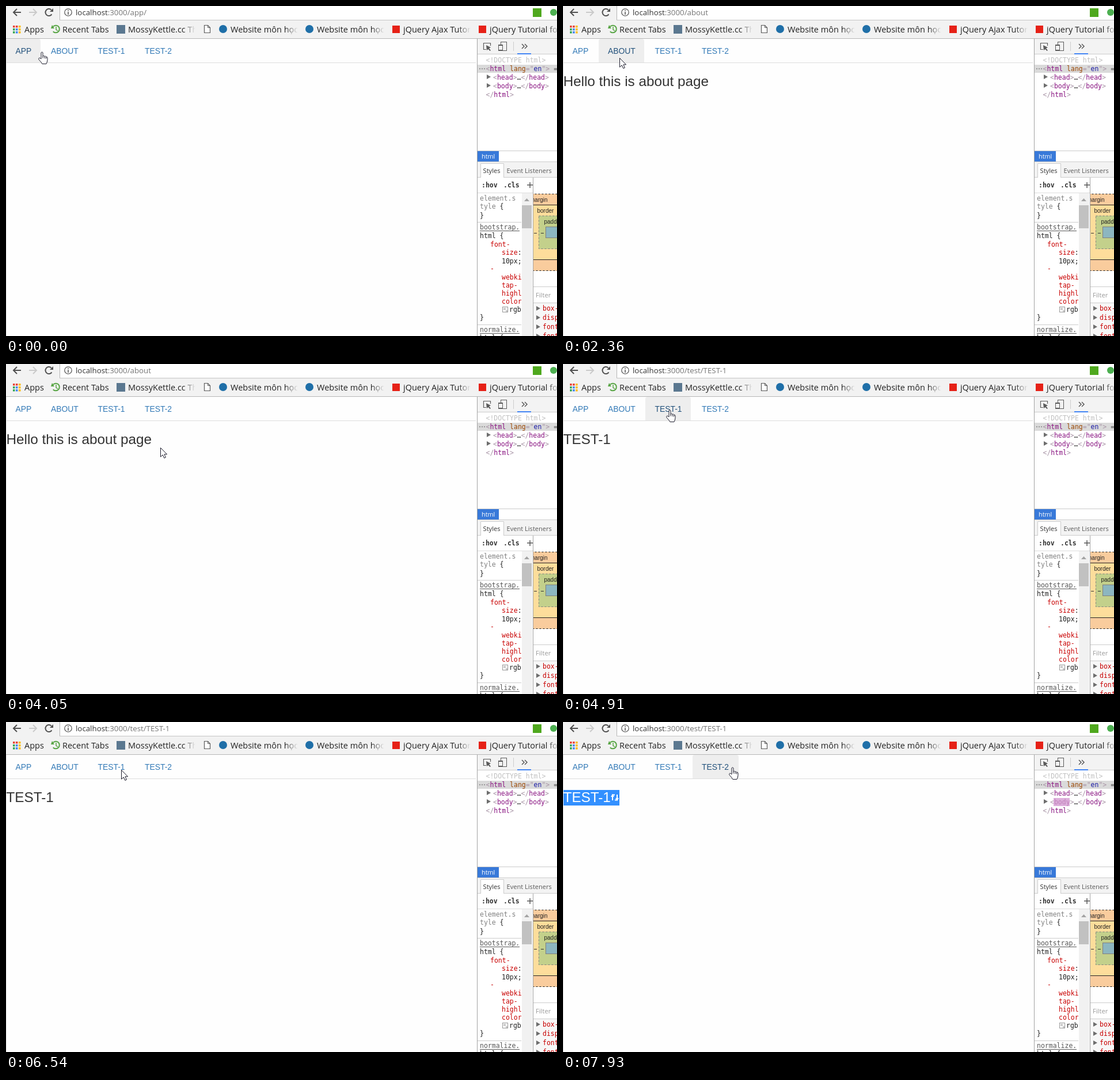
These frames come from a looping animation (957 px wide and 573 px high, 7.99 s). An HTML page with a canvas:

```html
<!DOCTYPE html>
<html lang="en">
<head>
<meta charset="utf-8">
<title>Router demo</title>
<style>
html, body { margin: 0; width: 100%; height: 100%; overflow: hidden; background: #fff; }
canvas { display: block; }
</style>
</head>
<body>
<canvas id="stage" width="957" height="573"></canvas>
<script>
const ctx = document.getElementById('stage').getContext('2d');
const LOOP = 7990;
const UI = '"Open Sans", "Noto Sans", sans-serif';
const ARIAL = '"Liberation Sans", Arial, sans-serif';
const MONO = '11.5px "DejaVu Sans Mono", monospace';
const HEAD = '24.3px ' + ARIAL;
const PURPLE = '#881280', BRACKET = '#a894a6', RED = '#c80000';

function rect(x, y, w, h, color) {
  ctx.fillStyle = color;
  ctx.fillRect(x, y, w, h);
}

function text(str, x, y, font, color) {
  ctx.font = font;
  ctx.fillStyle = color;
  ctx.fillText(str, x, y);
}

function width(str, font) {
  ctx.font = font;
  return ctx.measureText(str).width;
}

// Runs of differently coloured text: [string, color, string, color, ...]
function runs(x, y, font, parts) {
  for (let i = 0; i < parts.length; i += 2) {
    text(parts[i], x, y, font, parts[i + 1]);
    x += width(parts[i], font);
  }
}

function clipped(x, y, w, h, draw) {
  ctx.save();
  ctx.beginPath();
  ctx.rect(x, y, w, h);
  ctx.clip();
  draw();
  ctx.restore();
}

function line(points, color, w = 1, close = false) {
  ctx.beginPath();
  points.forEach(([x, y]) => ctx.lineTo(x, y));
  if (close) ctx.closePath();
  ctx.strokeStyle = color;
  ctx.lineWidth = w;
  ctx.stroke();
}

function shape(points, color) {
  ctx.beginPath();
  points.forEach(([x, y]) => ctx.lineTo(x, y));
  ctx.fillStyle = color;
  ctx.fill();
}

function arc(x, y, r, from, to, color, w) {
  ctx.beginPath();
  ctx.arc(x, y, r, from, to);
  ctx.strokeStyle = color;
  ctx.lineWidth = w;
  ctx.stroke();
}

function disc(x, y, r, color) {
  ctx.beginPath();
  ctx.arc(x, y, r, 0, 7);
  ctx.fillStyle = color;
  ctx.fill();
}

function frame(x, y, w, h, color, dash = []) {
  ctx.setLineDash(dash);
  ctx.strokeStyle = color;
  ctx.lineWidth = 1;
  ctx.strokeRect(x + .5, y + .5, w, h);
  ctx.setLineDash([]);
}

// ---- timeline ----

const latest = (list, t) => list.filter(e => e[0] <= t).pop();

const pages = [
  [0, 'app/', ''],
  [1700, 'about', 'Hello this is about page'],
  [4910, 'test/TEST-1', 'TEST-1']
];

const hovers = [[0, 'APP'], [100, ''], [150, 'ABOUT'], [2630, ''],
  [4500, 'TEST-1'], [6290, ''], [7760, 'TEST-2']];

// time, x, y of the hot spot, pointer used until the next entry
const path = [
  [0, 62, 79, 'hand'], [50, 62, 79, 'hand'], [460, 136, 79, 'hand'],
  [960, 136, 79, 'hand'], [1180, 120, 79, 'hand'], [2300, 120, 79, 'arrow'],
  [2490, 50, 112, 'arrow'], [2630, 50, 112, 'beam'], [2900, 31, 131, 'beam'],
  [3000, 31, 131, 'beam'], [3110, 70, 132, 'beam'], [3170, 97, 133, 'beam'],
  [3410, 254, 147, 'beam'], [3540, 273, 148, 'beam'], [3720, 271, 146, 'arrow'],
  [3850, 268, 145, 'arrow'], [4050, 268, 145, 'arrow'], [4500, 202, 92, 'hand'],
  [4730, 185, 79, 'hand'], [5470, 185, 79, 'hand'], [5600, 205, 56, 'arrow'],
  [5780, 236, 24, 'beam'], [5900, 247, 17, 'beam'], [6230, 323, 13, 'beam'],
  [6290, 323, 13, 'arrow'], [6660, 141, 116, 'arrow'], [6840, 141, 116, 'beam'],
  [7100, 72, 122, 'beam'], [7220, 85, 125, 'beam'], [7400, 85, 125, 'arrow'],
  [7650, 235, 112, 'arrow'], [7760, 268, 92, 'hand'], [7900, 294, 78, 'hand'],
  [LOOP, 294, 78, 'hand']
];

function pointerAt(t) {
  let i = 0;
  while (i < path.length - 2 && path[i + 1][0] <= t) i++;
  const a = path[i], b = path[i + 1];
  const k = (t - a[0]) / (b[0] - a[0]);
  return { x: a[1] + (b[1] - a[1]) * k, y: a[2] + (b[2] - a[2]) * k, kind: a[3] };
}

// ---- browser chrome ----

function bookmark(label, x, end) {
  const g = ctx.createLinearGradient(end - 22, 0, end, 0);
  g.addColorStop(0, '#222');
  g.addColorStop(1, 'rgba(34,34,34,0)');
  clipped(x - 2, 28, end - x + 2, 26, () => text(label, x, 46, '14.5px ' + UI, g));
}

function toolbar(t, url) {
  rect(0, 0, 957, 57, '#f2f2f2');
  rect(93, 0, 864, 24, '#fff');
  rect(93, 0, 1, 24, '#b4b4b4');
  rect(93, 24, 864, 1, '#c4c4c4');
  rect(0, 56, 957, 1, '#b6b6b6');

  line([[26, 11], [13, 11]], '#505050', 2);
  line([[19, 5], [13, 11], [19, 17]], '#505050', 2);
  line([[40, 11], [53, 11]], '#cacaca', 2);
  line([[47, 5], [53, 11], [47, 17]], '#cacaca', 2);
  arc(74.5, 11, 6, .6, 5.5, '#505050', 2);
  shape([[82, 4], [82, 10], [76, 10]], '#505050');

  arc(108, 11, 6.2, 0, 7, '#5a5a5a', 1.3);
  rect(107.2, 10, 1.6, 5, '#5a5a5a');
  rect(107.2, 7, 1.6, 1.7, '#5a5a5a');
  runs(121, 16, '13.3px ' + UI, ['localhost', '#333', ':3000/' + url, '#757575']);
  rect(915, 4, 15, 15, '#4fa81e');
  disc(951, 11, 6, '#4caf50');

  const dots = ['#ea4335', '#ea4335', '#fbbc05', '#34a853', '#4285f4', '#fbbc05', '#34a853', '#4285f4', '#fbbc05'];
  dots.forEach((c, i) => rect(12 + i % 3 * 5, 34 + Math.floor(i / 3) * 5, 3.5, 3.5, c));
  bookmark('Apps', 32, 95);
  arc(86.5, 40, 6.3, -2.4, 2.4, '#58a545', 2);
  shape([[78, 39], [84, 39], [80, 33]], '#58a545');
  line([[87, 36], [87, 41], [90, 43]], '#58a545', 1.5);
  bookmark('Recent Tabs', 98, 215);

  if (t >= 5650 && t < 6330) {
    ctx.fillStyle = '#e7e7e7';
    ctx.beginPath();
    ctx.roundRect(186, 27, 148, 27, 3);
    ctx.fill();
  }
  rect(192, 33, 15, 15, '#5b7890');
  bookmark('MossyKettle.cc Th', 212, 329);
  shape([[344, 33], [350, 33], [354, 37], [354, 47], [344, 47]], '#fff');
  line([[344.5, 33.5], [350.5, 33.5], [354.5, 37.5], [354.5, 46.5], [344.5, 46.5]], '#5a5a5a', 1.2, true);
  line([[350.5, 33.5], [350.5, 37.5], [354.5, 37.5]], '#5a5a5a');
  [377, 527].forEach(x => {
    disc(x, 40, 7, '#1f6fa8');
    bookmark('Website môn học', x + 13, x + 130);
  });
  rect(671, 34, 13, 13, '#e62117');
  bookmark('jQuery Ajax Tutorial', 690, 807);
  rect(821, 34, 13, 13, '#e62117');
  bookmark('jQuery Tutorial for', 840, 962);
}

// ---- page ----

const tabs = [['APP', 1, 59, 16.5], ['ABOUT', 62, 79, 78], ['TEST-1', 143, 79, 159.5], ['TEST-2', 225, 80, 241]];

function nav(hover) {
  rect(0, 57, 818, 516, '#fefefe');
  rect(0, 57, 1, 516, '#e2e2e2');
  rect(1, 98, 815, 1, '#ddd');
  for (const [label, x, w, tx] of tabs) {
    const on = label === hover;
    if (on) {
      ctx.fillStyle = '#eee';
      ctx.beginPath();
      ctx.roundRect(x, 57, w, 41, [4, 4, 0, 0]);
      ctx.fill();
    }
    text(label, tx, 83, '13.9px ' + ARIAL, on ? '#23527c' : '#337ab7');
  }
}

// End of the selection, snapped to the letter nearest the dragged pointer
function dragEnd(str, x) {
  let end = 2;
  for (let i = 3; i <= str.length; i++) {
    const a = width(str.slice(0, i - 1), HEAD), b = width(str.slice(0, i), HEAD);
    if (x > (a + b) / 2) end = i;
  }
  return width(str.slice(0, end), HEAD);
}

function heading(t, str) {
  text(str, .5, 139, HEAD, '#333');
  let from = 0, to = 0;
  if (t >= 3000 && t < 4050) {
    from = Math.round(width('He', HEAD));
    to = Math.round(dragEnd(str, pointerAt(t - 60).x));
  } else if (t >= 7200) {
    to = t < 7460 ? 81 : 97;
  }
  if (to <= from) return;
  clipped(from + 1, 118, to - from, 27, () => {
    rect(0, 118, 300, 27, '#3390ff');
    text(str, .5, 139, HEAD, '#fff');
  });
  if (to === 97) {
    line([[90, 126.5], [86, 126.5], [86, 136]], '#fff', 2);
    shape([[83, 130], [86, 125], [89, 130]], '#fff');
    line([[90, 135.5], [94, 135.5], [94, 126]], '#fff', 2);
    shape([[91, 132], [94, 137], [97, 132]], '#fff');
  }
}

// ---- developer tools ----

function triangle(x, y) {
  shape([[x, y - 4], [x + 7, y], [x, y + 4]], '#6e6e6e');
}

function elements(t) {
  rect(818, 57, 139, 516, '#fff');
  rect(819, 57, 138, 26, '#f3f3f3');
  rect(819, 83, 138, 1, '#ccc');
  line([[841.5, 69], [841.5, 64.5], [829.5, 64.5], [829.5, 75.5], [834, 75.5]], '#5a5a5a', 1.2);
  shape([[834, 68], [842, 72], [839, 73.5], [842, 77], [840.5, 78], [837.5, 75], [835, 77]], '#5a5a5a');
  frame(859, 62, 10, 15, '#5a5a5a');
  rect(855, 67, 8, 11, '#5a5a5a');
  rect(856, 69, 6, 7, '#f3f3f3');
  rect(881, 62, 1, 16, '#ccc');
  for (const x of [896, 901]) line([[x, 66], [x + 4, 70], [x, 74]], '#5a5a5a', 1.5);
  rect(888, 82, 24, 2, '#4285f4');

  text('<!DOCTYPE html>', 833.5, 98, MONO, '#c0c0c0');
  rect(819, 102, 138, 14, '#dadada');
  for (let i = 0; i < 3; i++) rect(822 + i * 4, 108, 2, 2, '#999');
  runs(833.5, 113, MONO, ['<', BRACKET, 'html', PURPLE, ' lang', '#994500', '="', BRACKET,
    'en', '#1a1aa6', '"', BRACKET, '>', BRACKET, ' == $0', '#555']);
  ['head', 'body'].forEach((tag, i) => {
    const y = 128 + i * 15;
    triangle(835, y - 5);
    runs(846, y, MONO, ['<', BRACKET, tag, PURPLE, '>', BRACKET, '…', '#333',
      '</', BRACKET, tag, PURPLE, '>', BRACKET]);
  });
  if (t >= 7500) {
    const a = 1 - (t - 7500) / 1400;
    rect(852, 132, 28, 14, '#fff');
    rect(852, 132, 28, 14, `rgba(190,100,185,${a * .75})`);
    text('body', 852.9, 143, MONO, `rgba(160,80,152,${1 - a * .75})`);
  }
  runs(833.5, 158, MONO, ['</', BRACKET, 'html', PURPLE, '>', BRACKET]);

  rect(819, 251, 138, 1, '#ccc');
  rect(819, 252, 37, 18, '#3879d9');
  text('html', 826, 265, '10.8px ' + UI, '#fff');
  rect(819, 270, 138, 1, '#ccc');
}

function styles() {
  rect(819, 271, 138, 27, '#f3f3f3');
  rect(819, 297, 138, 1, '#ccc');
  rect(824, 273, 40, 25, '#fff');
  line([[824.5, 298], [824.5, 273.5], [864.5, 273.5], [864.5, 298]], '#ccc');
  text('Styles', 828.5, 290, '11.2px ' + UI, '#333');
  text('Event Listeners', 869.5, 290, '11.1px ' + UI, '#5a5a5a');
  text(':hov', 826, 315, 'bold ' + MONO, '#333');
  text('.cls', 864, 315, 'bold ' + MONO, '#333');
  rect(905, 310, 10, 1.5, '#5a5a5a');
  rect(909.3, 306, 1.5, 10, '#5a5a5a');
  rect(819, 324, 96, 1, '#ddd');

  clipped(819, 325, 76, 248, () => {
    const put = (str, x, y, color) => text(str, x, y, MONO, color);
    const link = (str, y) => {
      put(str, 823, y, '#555');
      rect(823, y + 2, 69, 1, '#555');
    };
    put('element.s', 823, 338, '#808080');
    runs(823, 352, MONO, ['tyle', '#808080', ' {', '#222']);
    put('}', 823, 368, '#222');
    rect(819, 375, 76, 1, '#ccc');
    link('bootstrap.', 388);
    put('html {', 823, 403, '#222');
    put('font-', 841, 418, RED);
    runs(861, 432, MONO, ['size', RED, ':', '#222']);
    put('10px;', 861, 447, '#222');
    put('-', 841, 460, RED);
    ['webkit-', 'tap-', 'highlight-', 'color:'].forEach((s, i) => put(s, 861, 475 + i * 14, RED));
    frame(862, 522, 9, 9, '#999');
    rect(864, 524, 4, 4, '#ccc');
    rect(868, 528, 3, 3, '#ccc');
    put('rgba(', 874, 531, '#222');
    put('}', 823, 545, '#222');
    rect(819, 553, 76, 1, '#ccc');
    link('normalize.', 566);
    put('html {', 823, 580, '#222');
  });

  rect(896, 325, 18, 248, '#f1f1f1');
  shape([[900, 339], [904.5, 334], [909, 339]], '#a3a3a3');
  rect(896, 346, 17, 40, '#c1c1c1');
  rect(915, 298, 1, 275, '#a3a3a3');
}

function boxModel() {
  const small = '10px ' + ARIAL;
  clipped(916, 298, 41, 275, () => {
    rect(916, 326, 41, 134, '#f9cc9d');
    frame(900, 326, 80, 133, '#222', [3, 3]);
    text('margin', 910, 340, small, '#222');
    rect(916, 345, 41, 96, '#fddd9b');
    frame(900, 345, 80, 95, '#222');
    text('border', 922.5, 359, small, '#222');
    rect(925, 364, 40, 58, '#c3d08b');
    frame(925, 364, 80, 57, '#808080', [3, 3]);
    text('padding', 934.5, 378, small, '#222');
    rect(937, 383, 40, 20, '#8cb6c0');
    frame(937, 383, 80, 19, '#808080');
    rect(917, 394, 5, 1, '#333');
    rect(929, 394, 5, 1, '#333');
    rect(916, 487, 41, 1, '#ccc');
    text('Filter', 920, 506, '11.2px ' + UI, '#999');
    rect(916, 515, 41, 58, '#f7f7f7');
    rect(916, 515, 41, 1, '#ccc');
    ['box-sizing', 'display', 'font-family', 'font-size'].forEach((name, i) => {
      triangle(921, 525 + i * 16);
      text(name, 932, 529 + i * 16, MONO, RED);
    });
  });
  rect(818, 57, 1, 516, '#a3a3a3');
}

// ---- pointers ----

const hand = new Path2D('M5 13V2Q6.5-.6 8 2V8Q9.8 6.6 11 8.4Q12.6 7.4 13.6 9.2Q15.6 8.6 16 11V14.5Q15.8 18 14 21.5H6.8Q5.5 18.5 1.4 14.5Q-.4 11.6 1.8 11Q3.4 11.2 5 13Z');
const arrow = new Path2D('M.5.5V16.2L4.2 12.8L6.8 18.4L9.4 17.2L6.9 11.8H11.6Z');

const pointers = {
  hand() {
    ctx.translate(-6, 0);
    outlined(hand);
    ctx.stroke(new Path2D('M8 8V11.5M11 9V12M13.6 9.5V12.5'));
  },
  arrow() {
    outlined(arrow);
  },
  beam() {
    const p = new Path2D('M-3-7.5H-1Q.5-7.5.5-6Q.5-7.5 2-7.5H4M.5-6V6M-3 7.5H-1Q.5 7.5.5 6Q.5 7.5 2 7.5H4');
    ctx.lineWidth = 1.1;
    ctx.strokeStyle = '#111';
    ctx.stroke(p);
  }
};

function outlined(p) {
  ctx.fillStyle = '#fff';
  ctx.strokeStyle = '#1c1c2c';
  ctx.lineWidth = 1;
  ctx.fill(p);
  ctx.stroke(p);
}

function draw(t) {
  const [, url, title] = latest(pages, t);
  toolbar(t, url);
  nav(latest(hovers, t)[1]);
  heading(t, title);
  elements(t);
  styles();
  boxModel();
  const p = pointerAt(t);
  ctx.save();
  ctx.translate(Math.round(p.x), Math.round(p.y));
  pointers[p.kind]();
  ctx.restore();
}

const start = performance.now();
function tick() {
  draw((performance.now() - start) % LOOP);
  requestAnimationFrame(tick);
}
tick();
</script>
</body>
</html>
```
